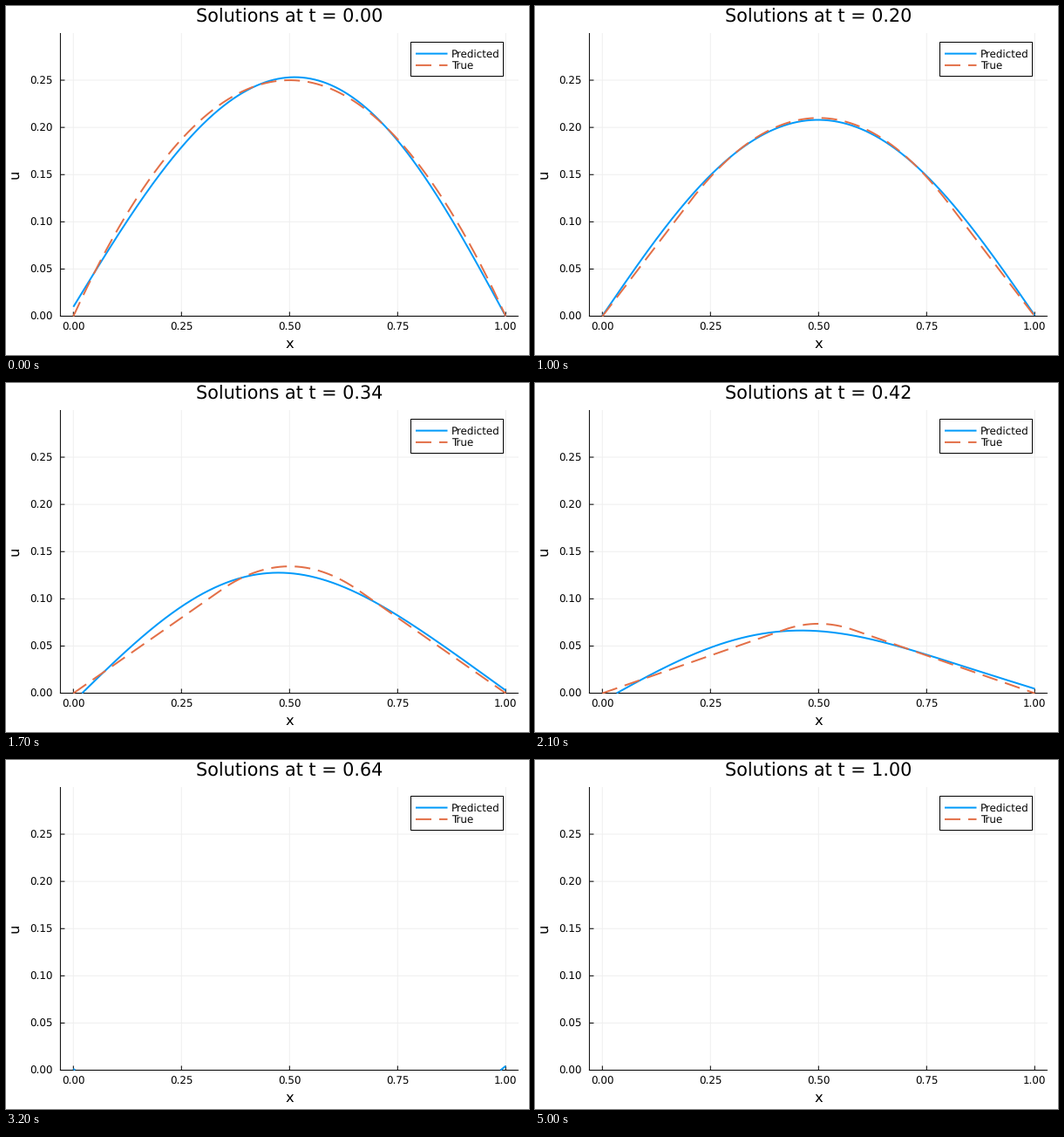
Write a matplotlib script that moves like this. It is 600 px wide and 400 px high and loops after 5.05 s.

```python
import numpy as np
import matplotlib
import matplotlib.pyplot as plt
from matplotlib.animation import FuncAnimation

W, H, DPI = 600, 400, 100
FRAMES, STEP_MS = 101, 50
BLUE, ORANGE, GRID = "#009afa", "#e36f47", "#efefef"
LEFT, RIGHT, TOP, BOTTOM = 62.4, 588, 31, 355.5
X0, XSCALE = 77.3, 496.0
Y0, YSCALE = 355.6, 1082.3
PT = 72 / DPI  # points per pixel

matplotlib.rcParams["font.family"] = "DejaVu Sans"
matplotlib.rcParams["text.hinting"] = "no_hinting"
matplotlib.rcParams["lines.scale_dashes"] = False

# Fitted surrogate: end values and sine amplitudes at a few times
KEY_T = np.array([0, 0.11, 0.20, 0.34, 0.51, 0.78, 1.0])
END_LEFT = [0.010, 0.006, 0.0005, -0.009, -0.005, 0.0064, -0.001]
END_RIGHT = [0, 0.0002, 0.001, 0.003, 0.0063, 0.001, -0.002]
SINE1 = [-0.0085, -0.0055, -0.0003, 0.0045, -0.001, 0, 0]
SINE2 = [-0.006, -0.004, 0.0005, 0.0077, 0.0045, 0, 0]
SINE3 = [0.0015, 0.0012, 0.0012, -0.0014, 0, 0, 0]

xs = np.linspace(0, 1, 2001)


def smooth(keys, t):
    """Cubic Hermite interpolation over KEY_T."""
    v = np.array(keys, float)
    m = np.gradient(v, KEY_T)
    i = min(np.searchsorted(KEY_T, t, side="right") - 1, len(v) - 2)
    h = KEY_T[i + 1] - KEY_T[i]
    s = (t - KEY_T[i]) / h
    return ((1 + 2 * s) * (1 - s) ** 2 * v[i] + s * (1 - s) ** 2 * h * m[i]
            + s * s * (3 - 2 * s) * v[i + 1] + s * s * (s - 1) * h * m[i + 1])


def parabola(s):
    """Odd, 2-periodic extension of x(1 - x)."""
    m = (s + 1) % 2 - 1
    return m * (1 - np.abs(m))


def true_u(t):
    return (parabola(xs + t) + parabola(xs - t)) / 2


def predicted_u(t):
    c1 = 8 / np.pi ** 3 * np.cos(np.pi * t) + smooth(SINE1, t)
    return (smooth(END_LEFT, t) * (1 - xs) + smooth(END_RIGHT, t) * xs
            + c1 * np.sin(np.pi * xs)
            + smooth(SINE2, t) * np.sin(2 * np.pi * xs)
            + smooth(SINE3, t) * np.sin(3 * np.pi * xs))


def to_px(x):
    return X0 + XSCALE * x


def to_py(u):
    return Y0 - YSCALE * u


def visible(u):
    return np.where(u >= -1e-9, to_py(u), np.nan)


fig = plt.figure(figsize=(W / DPI, H / DPI), dpi=DPI, facecolor="white")
ax = fig.add_axes([0, 0, 1, 1])
ax.set_xlim(0, W)
ax.set_ylim(H, 0)
ax.axis("off")


def line(x, y, color="black", width=1.0, z=2, **kw):
    return ax.plot(x, y, color=color, lw=width * PT, zorder=z, snap=False,
                   solid_capstyle="butt", dash_capstyle="butt", **kw)[0]


def label(x, y, text, size, ha="center", **kw):
    return ax.text(x, y, text, fontsize=size * PT, ha=ha, va="baseline",
                   color="black", zorder=7, **kw)


DASH = dict(dashes=(18 * PT, 9 * PT))

for k in range(5):
    px = to_px(k / 4)
    line([px, px], [TOP, BOTTOM], GRID, z=1)
    line([px, px], [BOTTOM, BOTTOM - 5])
    label(px, 372, f"{k / 4:.2f}", 11.9)
for k in range(6):
    py = to_py(k / 20)
    if k:
        line([LEFT, RIGHT], [py, py], GRID, z=1)
        line([LEFT, LEFT + 5], [py, py])
    label(54.1, py + 4.7, f"{k / 20:.2f}", 11.9, ha="right")
line([LEFT - 0.5, RIGHT], [BOTTOM, BOTTOM])
line([LEFT, LEFT], [TOP, BOTTOM])

label(325.2, 391.6, "x", 16.4)
label(15.6, 192.7, "u", 16.4, rotation=90, rotation_mode="anchor")
title = label(325.2, 18.3, "", 20.8)

pred_line = line([], [], BLUE, 2, z=3)
true_line = line([], [], ORANGE, 2, z=4, **DASH)

ax.add_patch(plt.Rectangle((464.5, 41.5), 106, 39, facecolor="white",
                           edgecolor="black", lw=PT, zorder=5, snap=False))
line([470, 506.5], [54.6, 54.6], BLUE, 2, z=6)
line([470, 506.5], [67.9, 67.9], ORANGE, 2, z=6, **DASH)
label(510.6, 59, "Predicted", 11.9, ha="left")
label(511, 72.3, "True", 11.9, ha="left")


def draw(i):
    t = i / (FRAMES - 1)
    pred_line.set_data(to_px(xs), visible(predicted_u(t)))
    true_line.set_data(to_px(xs), visible(true_u(t)))
    title.set_text(f"Solutions at t = {t:.2f}")
    return pred_line, true_line, title


anim = FuncAnimation(fig, draw, frames=FRAMES, interval=STEP_MS,
                     repeat=True, repeat_delay=0, blit=False)
plt.show()
```
